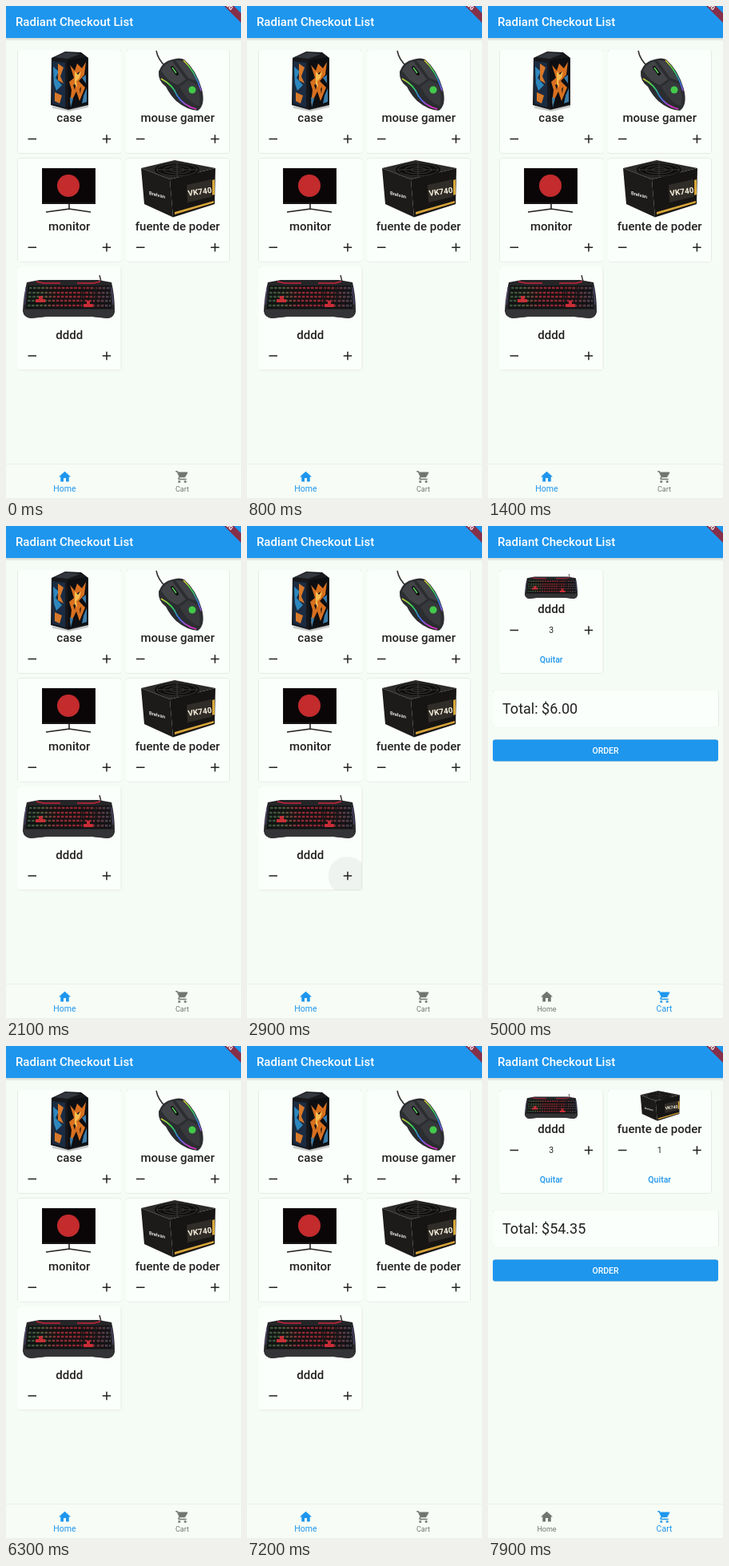
Recreate the animation shown at these times as an HTML page. Size 294 by 616 pixels, loop 8000 ms.

```html
<!DOCTYPE html>
<html lang="en">
<head>
<meta charset="utf-8">
<title>Shop</title>
<style>
  html, body { margin: 0; width: 100%; height: 100%; overflow: hidden; background: #f5fbf5; }
  #stage { position: fixed; inset: 0; width: 100%; height: 100%; font-family: Roboto, sans-serif; fill: #212121; }
  .medium { font-weight: 500; }
  .mid { text-anchor: middle; }
  .name { font-size: 15px; font-weight: 500; text-anchor: middle; }
  .small { font-size: 10.5px; text-anchor: middle; }
  .blue { fill: #1e96ee; }
  .white { fill: #fff; }
  .card { fill: #fbfffb; filter: drop-shadow(0 .8px .5px rgba(0,0,0,.3)); }
  .sign { stroke: #212121; stroke-width: 1.5; fill: none; }

  .home, .cart, .two, .three, .keys-total, .both { animation: 8s step-end infinite; }
  .home { animation-name: home; }
  .cart { animation-name: cart; }
  .two { animation-name: two; }
  .three { animation-name: three; }
  .keys-total { animation-name: keys-total; }
  .both { animation-name: both; }
  @keyframes home { 0%, 73.75% { opacity: 1 } 43.5%, 93.75%, 100% { opacity: 0 } }
  @keyframes cart { 0%, 73.75% { opacity: 0 } 43.5%, 93.75%, 100% { opacity: 1 } }
  @keyframes two { 0% { opacity: 1 } 53.5%, 100% { opacity: 0 } }
  @keyframes three { 0% { opacity: 0 } 53.5%, 100% { opacity: 1 } }
  @keyframes keys-total { 0%, 80% { opacity: 0 } 53.5% { opacity: 1 } 100% { opacity: 0 } }
  @keyframes both { 0% { opacity: 0 } 80%, 100% { opacity: 1 } }

  .tap { fill: #000; transform-box: fill-box; transform-origin: center; animation: tap 8s infinite; }
  @keyframes tap {
    0% { opacity: 0; transform: scale(.3); animation-timing-function: ease-out }
    1.8%, 3% { opacity: .05; transform: none }
    4.7%, 100% { opacity: 0; transform: none }
  }

  .tab { animation: tab-a 8s ease-in-out infinite; }
  .tab text { font-size: 9px; text-anchor: middle; animation: label-a 8s ease-in-out infinite; }
  .tab.b { animation-name: tab-b; }
  .tab.b text { animation-name: label-b; }
  @keyframes tab-a { 0%, 43.5%, 76.25%, 93.75% { fill: #1e96ee } 46%, 73.75%, 96.25%, 100% { fill: #707570 } }
  @keyframes tab-b { 0%, 43.5%, 76.25%, 93.75% { fill: #707570 } 46%, 73.75%, 96.25%, 100% { fill: #1e96ee } }
  @keyframes label-a { 0%, 43.5%, 76.25%, 93.75% { transform: scale(1.167) } 46%, 73.75%, 96.25%, 100% { transform: none } }
  @keyframes label-b { 0%, 43.5%, 76.25%, 93.75% { transform: none } 46%, 73.75%, 96.25%, 100% { transform: scale(1.167) } }
</style>
</head>
<body>
<svg id="stage" viewBox="0 0 294 616" preserveAspectRatio="none">
  <defs>
    <linearGradient id="rainbow" x1="0" y1="0" x2=".6" y2="1">
      <stop offset="0" stop-color="#e33"/><stop offset=".25" stop-color="#ec3"/>
      <stop offset=".5" stop-color="#3d5"/><stop offset=".75" stop-color="#37e"/><stop offset="1" stop-color="#d3c"/>
    </linearGradient>
    <linearGradient id="keylight" gradientUnits="userSpaceOnUse" x1="28" y1="0" x2="130" y2="0">
      <stop offset="0" stop-color="#35553a"/><stop offset=".18" stop-color="#4f5a38"/>
      <stop offset=".35" stop-color="#8c2a30"/><stop offset=".7" stop-color="#94262e"/>
      <stop offset=".82" stop-color="#6b3036"/><stop offset="1" stop-color="#45414f"/>
    </linearGradient>
    <linearGradient id="under" x1="0" y1="0" x2="0" y2="1">
      <stop offset="0" stop-opacity=".15"/><stop offset="1" stop-opacity="0"/>
    </linearGradient>

    <g id="case">
      <path fill="#c9ccc9" d="M58 125 78 130 103 123V127L79 132 58 128Z"/>
      <path fill="#17181c" d="M57 65 74 57 94 58 103 65V124L78 130 56 124Z"/>
      <path fill="#33363c" d="M60 64 75 58 93 60 77 66Z"/>
      <path fill="#1b2c42" d="M58 69 74 71V127L58 122Z"/>
      <path fill="#2d87bd" d="M59 76 66 82 62 90 70 99 63 106 60 97Z"/>
      <path fill="#d7792a" d="M65 72 72 77 68 88 72 97 65 93ZM61 108 70 112 67 122 61 119Z"/>
      <path fill="#0d0e12" d="M77 68 102 64V122L78 129Z"/>
      <path fill="#d8701f" d="M80 74 86 81 89 72 95 78 100 70 98 86 91 94 99 102 92 119 88 107 80 123 82 105 79 95 85 90Z"/>
      <path fill="#17181c" d="M87 86 92 82 90 90ZM84 99 88 96 86 105ZM92 104 94 101 93 110Z"/>
      <path fill="#f5bb4f" d="M86 82 90 86 94 82 92 90 88 94 89 102 86 98Z"/>
      <path fill="#3c7ca8" d="M80 114 84 116 81 127ZM97 112 101 103 101 120 95 122ZM95 90 100 86 100 97Z"/>
    </g>

    <g id="mouse">
      <path fill="none" stroke="#333" stroke-width="1.6" d="M188 56Q190 67 200 76"/>
      <path fill="#2b2d30" d="M191 82Q196 69 208 67 217 64 223 67 238 80 245 104 250 124 240 131 226 130 213 119 205 111 200 101 190 94 191 82Z"/>
      <path fill="#414347" d="M194 81Q199 71 208 69L225 92 215 99Q203 95 194 81ZM212 68 221 69Q233 80 238 94L228 90Z"/>
      <path fill="#37393d" d="M217 101 228 93 239 98Q244 112 242 125 229 123 217 101Z"/>
      <path fill="none" stroke="url(#rainbow)" stroke-width="1.7" d="M222 68Q237 82 244 106M194 91Q209 99 214 112 222 125 238 129"/>
      <path stroke="#111" stroke-width="4" stroke-linecap="round" d="M208 77 214 85"/>
      <path stroke="#5bd35b" stroke-width="1.5" d="M208 77 213 84"/>
      <circle cx="233" cy="105" r="4.5" fill="#45c94b"/>
    </g>

    <g id="monitor">
      <path fill="#1b1719" d="M45 203H112V248H45Z"/>
      <path fill="#0a0607" d="M46 204H111V246H46Z"/>
      <circle cx="78" cy="225" r="14" fill="#c32b2d"/>
      <path fill="none" stroke="#242224" stroke-width="1.6" d="M79 248V254L50 258M79 254 106 258"/>
    </g>

    <g id="psu">
      <path fill="#2d2b29" d="M169 203 211 193 262 203 205 217Z"/>
      <path fill="#1d1b1a" d="M169 203 205 217 209 264.5 173 248Z"/>
      <path fill="#171513" d="M205 217 262 203 261 248 209 264.5Z"/>
      <ellipse cx="214" cy="205" rx="28" ry="9" fill="#0f0e0e"/>
      <g fill="none" stroke="#4a4744" stroke-width=".7">
        <ellipse cx="214" cy="205" rx="25" ry="7.8"/><ellipse cx="214" cy="205" rx="17" ry="5"/>
        <ellipse cx="214" cy="205" rx="9" ry="2.6"/><path d="M188 205H240M214 196V214"/>
      </g>
      <path fill="#302c27" d="M226 224 257 217V239L227 246Z"/>
      <path fill="#d8a53a" d="M258 218 261 217V236L258 237ZM211 258 260 244V246.5L211 261Z"/>
      <text fill="#f6efdc" font-weight="700" font-size="10" transform="translate(228 238) rotate(-8)">VK740</text>
      <text class="medium white" font-size="6" transform="translate(179 236) skewY(14)">Brelvan</text>
    </g>

    <g id="keyboard">
      <path fill="none" stroke="#333" stroke-width="1.4" d="M117 337 119 345"/>
      <path fill="#252528" d="M26 346 42 343H115L132 346Q136 362 136 383 135 390 127 391L108 389H50L31 391Q22 390 21 382 22 362 26 346Z"/>
      <path fill="#343436" d="M22 380H135Q135 390 127 391L108 389H50L31 391Q22 390 22 380Z"/>
      <path fill="none" stroke="#c8253b" stroke-width="1.6" d="M38 345 47 347H68M89 347H110L118 345"/>
      <path fill="#121214" d="M28 350H130L132 379H25Z"/>
      <g fill="none" stroke="url(#keylight)" stroke-width="2.6" stroke-dasharray="3.6 1.5">
        <path d="M29 353 130 353.1M28 359 131 359.1M28 364 131 364.1M27 369 131 369.1M27 375 131 375.1"/>
      </g>
      <path stroke="#17171a" stroke-width="1.5" d="M96 351V378M112 351V378"/>
      <path fill="#e0303a" d="M41 363H46V367H49V371H37V367H41ZM101 369H105V373H109V377H97V373H101Z" opacity=".85"/>
      <path stroke="#5b4f83" d="M25 352 23 374M132 352 134 374"/>
    </g>
  </defs>

  <rect width="294" height="616" fill="#f5fbf5"/>
  <g id="home" class="home"></g>
  <g id="cart" class="cart"></g>

  <rect y="40" width="294" height="4" fill="url(#under)"/>
  <rect width="294" height="40" fill="#1e96ee"/>
  <text class="medium white" x="12" y="24.5" font-size="15">Radiant Checkout List</text>
  <path fill="#85304a" d="M273 0H285L294 9V21Z"/>
  <text class="white mid" font-size="7" font-weight="900" transform="translate(275 -4) rotate(45)" y="2.5">DEBUG</text>

  <rect y="573" width="294" height="43" fill="#f7fcf6"/>
  <path stroke="#e9efe9" d="M0 573.5H294"/>
  <g class="tab">
    <path transform="translate(64.5 580.5) scale(.75)" d="M10 20v-6h4v6h5v-8h3L12 3 2 12h3v8z"/>
    <g transform="translate(73.5 608)"><text>Home</text></g>
  </g>
  <g class="tab b">
    <path transform="translate(211.5 580.5) scale(.75)" d="M7 18a2 2 0 1 0 0 4 2 2 0 0 0 0-4zM1 2v2h2l3.6 7.6-1.35 2.4C4.5 15.4 5.5 17 7 17h12v-2H7.4a.25.25 0 0 1-.2-.4l.9-1.6h7.45c.75 0 1.4-.4 1.75-1l3.6-6.5A1 1 0 0 0 20 4H5.2l-.93-2zM17 18a2 2 0 1 0 0 4 2 2 0 0 0 0-4z"/>
    <g transform="translate(220.5 608)"><text>Cart</text></g>
  </g>
</svg>
<script>
  const LOOP = 8000;
  const columns = [14.5, 150], rows = [55, 190.8, 326.5];

  // Negative delays keep every tap in step with the loop.
  const taps = (x, y, times) => times.map(time =>
    `<circle class="tap" cx="${x}" cy="${y}" r="24" style="animation-delay:${time - LOOP}ms"/>`).join('');

  const card = (col, row, name, nameY, signY, times, extra) => `
    <g transform="translate(${columns[col]} ${rows[row]})">
      <rect class="card" width="129.5" height="129.5" rx="3"/>
      <svg width="129.5" height="129.5">${taps(111, signY, times)}</svg>
      <text class="name" x="64.7" y="${nameY}">${name}</text>
      <path class="sign" d="M13 ${signY}h10.5M106.2 ${signY}h10.5m-5.25-5.25v10.5"/>
      ${extra}
    </g>`;

  const homeCard = (index, name, image, times = []) =>
    card(index % 2, index >> 1, name, 90.2, 111.5, times, '') + `<use href="#${image}"/>`;

  const cartCard = (col, name, count, image, times = []) =>
    card(col, 0, name, 53.8, 75.4, times, `
      <g class="small">${count}</g>
      <text class="small medium blue" x="64.7" y="115.5">Quitar</text>`) + image;

  const count = (value, cls = '') => `<text class="${cls}" x="64.7" y="79.2">${value}</text>`;
  const total = (value, cls) => `<text class="${cls}" x="18" y="234.5" font-size="18">Total: $${value}</text>`;
  const thumb = (id, x, y, scale, fromX, fromY) =>
    `<use href="#${id}" transform="translate(${x} ${y}) scale(${scale}) translate(${-fromX} ${-fromY})"/>`;

  document.getElementById('home').innerHTML =
    homeCard(0, 'case', 'case') +
    homeCard(1, 'mouse gamer', 'mouse') +
    homeCard(2, 'monitor', 'monitor') +
    homeCard(3, 'fuente de poder', 'psu', [6850]) +
    homeCard(4, 'dddd', 'keyboard', [2330, 2750]);

  document.getElementById('cart').innerHTML =
    cartCard(0, 'dddd', count(2, 'two') + count(3, 'three'),
      thumb('keyboard', 79, 75.5, .575, 78.5, 364), [4200]) +
    `<g class="both">${cartCard(1, 'fuente de poder', count(1),
      thumb('psu', 215, 74.5, .53, 215, 228))}</g>
    <rect class="card" x="6" y="206" width="282.5" height="45" rx="3"/>
    ${total('4.00', 'two')}${total('6.00', 'keys-total')}${total('54.35', 'both')}
    <rect class="card" x="6" y="267.5" width="282" height="27" rx="3" style="fill:#1e96ee"/>
    <text class="small medium white" x="147" y="285">ORDER</text>`;
</script>
</body>
</html>
```
